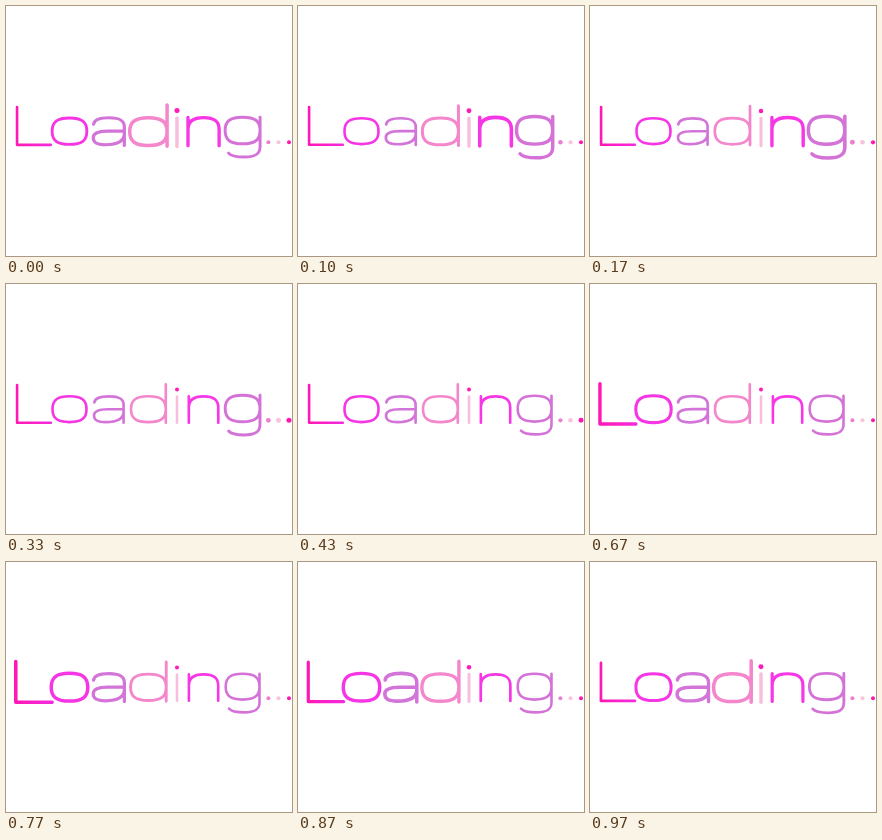
Recreate the animation shown at these times as an HTML page with a canvas. Size 286 px wide and 250 px high, loop 1000 ms.

```html
<!DOCTYPE html>
<html lang="en">
<head>
<meta charset="utf-8">
<title>Loading...</title>
<style>
html, body { margin: 0; width: 100%; height: 100%; overflow: hidden; background: #fff; }
canvas { display: block; }
</style>
</head>
<body>
<canvas id="stage" width="286" height="250" aria-label="Loading..."></canvas>
<script>
const ctx = document.getElementById('stage').getContext('2d');
const LOOP = 1000, STEPS = 30;
const FIRST_PEAK = 740, LAG = 70, SPREAD = 290;
const GROWTH = 0.08, WEIGHT = 2.6, EXTRA_WEIGHT = 0.7;

// Squarish oval, given by its centre and radii
function oval(x, y, rx, ry) {
  const k = 0.71, a = rx * k, b = ry * k;
  return `M${x - rx} ${y}C${x - rx} ${y - b} ${x - a} ${y - ry} ${x} ${y - ry}` +
    `S${x + rx} ${y - b} ${x + rx} ${y}S${x + a} ${y + ry} ${x} ${y + ry}` +
    `S${x - rx} ${y + b} ${x - rx} ${y}Z`;
}

function glyph(d, cx, cy, color, dot) {
  return { path: new Path2D(d), cx, cy, color, dot };
}

function period(x, color) {
  return { cx: x, cy: 136.3, dot: { x, y: 136.3, color } };
}

const pinkToMagenta = ctx.createLinearGradient(10, 0, 46, 0);
pinkToMagenta.addColorStop(0, '#ff18b2');
pinkToMagenta.addColorStop(1, '#f42ade');

const glyphs = [
  glyph('M11.1 101V138.8H44.8', 28, 120, pinkToMagenta),
  glyph(oval(63.5, 125.2, 17, 12.9), 63.5, 125.2, '#f636e4'),
  glyph('M88.3 118.5C89 114 94 112.4 103 112.4C113.5 112.4 117.6 115 117.6 121V138.8' +
    'M117.6 125.2H102C92 125.2 88 127 88 131.5C88 136.5 91.5 138.1 99.5 138.1' +
    'C111 138.1 117.6 134.5 117.6 127.5', 102.8, 125.2, '#d374d8'),
  glyph(oval(142.4, 125.2, 17.4, 12.9) + 'M159.8 100.4V138.8', 142.4, 119.6, '#f486cb'),
  glyph('M171 112.5V138.8', 171, 118, '#f7bfdd', { x: 171, y: 105.6, color: '#ff1cb4' }),
  glyph('M182.9 112.3V138.8M182.9 123.5C182.9 116 188 112.4 197.5 112.4' +
    'C208 112.4 212.2 116 212.2 123.5V138.8', 197.5, 125.2, '#f736e6'),
  glyph(oval(236.6, 124.7, 16.9, 12.9) + 'M253.5 111.8V140.5C253.5 147.5 249 150.4 238 150.4' +
    'C229 150.4 225 149 223 146.6', 236.6, 130.5, '#d472d8'),
  period(262.4, '#ea80cf'),
  period(272.5, '#f8c4dc'),
  period(283, '#ff17b0')
];

// Smooth bump that repeats every loop
function swell(t, peak) {
  const gap = ((t - peak) % LOOP + LOOP * 1.5) % LOOP - LOOP / 2;
  return Math.abs(gap) < SPREAD ? (1 + Math.cos(Math.PI * gap / SPREAD)) / 2 : 0;
}

function draw(t) {
  ctx.fillStyle = '#fff';
  ctx.fillRect(0, 0, 286, 250);
  ctx.lineCap = ctx.lineJoin = 'round';
  glyphs.forEach((g, i) => {
    const bump = swell(t, FIRST_PEAK + i * LAG);
    const scale = 1 + GROWTH * bump;
    ctx.save();
    ctx.translate(g.cx, g.cy);
    ctx.scale(scale, scale);
    ctx.translate(-g.cx, -g.cy);
    if (g.path) {
      ctx.lineWidth = WEIGHT + EXTRA_WEIGHT * bump;
      ctx.strokeStyle = g.color;
      ctx.stroke(g.path);
    }
    if (g.dot) {
      ctx.fillStyle = g.dot.color;
      ctx.beginPath();
      ctx.arc(g.dot.x, g.dot.y, 2 + EXTRA_WEIGHT / 2 * bump, 0, Math.PI * 2);
      ctx.fill();
    }
    ctx.restore();
  });
}

function tick(now) {
  const t = now % LOOP;
  // Steps start on whole hundredths of a second
  const step = Math.floor((t + 3.4) * STEPS / LOOP);
  draw(step * LOOP / STEPS);
  requestAnimationFrame(tick);
}
draw(0);
requestAnimationFrame(tick);
</script>
</body>
</html>
```
